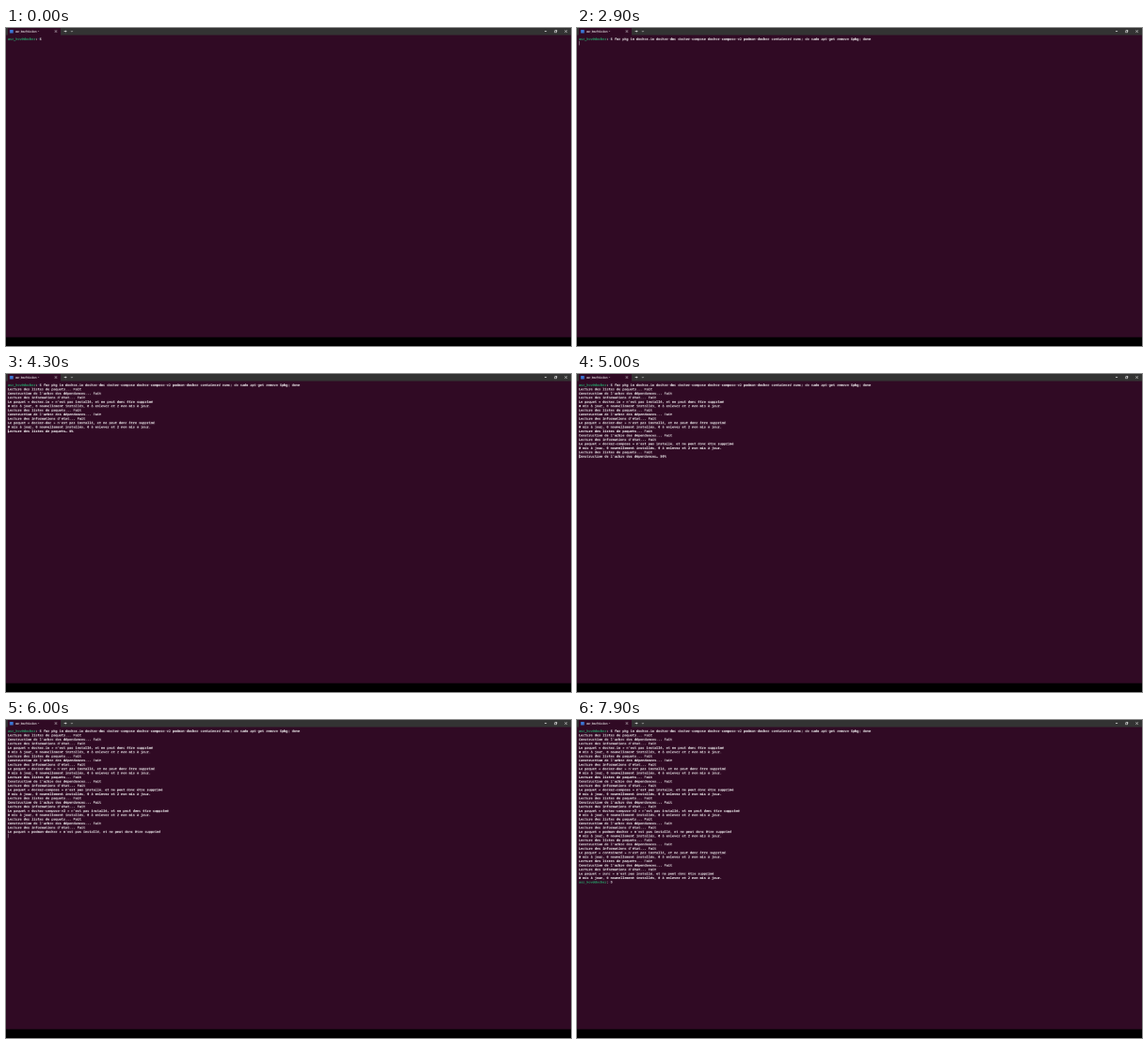
An HTML page with a canvas for the animation above (8000 ms loop, 600x338 px).

```html
<!DOCTYPE html>
<html lang="fr">
<head>
<meta charset="utf-8">
<title>Terminal</title>
<style>
html, body { margin: 0; width: 100%; height: 100%; overflow: hidden; background: #000; }
canvas { display: block; width: 600px; height: 338px; }
</style>
</head>
<body>
<canvas id="stage" width="600" height="338"></canvas>
<script>
const LOOP = 8000;
const W = 2560, H = 1440;           // the desktop is drawn full size, then scaled down
const CELL_W = 9, CELL_H = 19, LEFT = 8, TOP = 40;
const BG = '#300a24', FG = '#ffffff', BAR = '#333333';
const GREEN = '#26a269', BLUE = '#12488b';
const MONO = 'bold 15px "Noto Sans Mono", "DejaVu Sans Mono", monospace';

const USER = 'usr_kov@docker';
const PROMPT_LEN = USER.length + 4;
const PACKAGES = ['docker.io', 'docker-doc', 'docker-compose', 'docker-compose-v2',
  'podman-docker', 'containerd', 'runc'];
const COMMAND = `for pkg in ${PACKAGES.join(' ')}; do sudo apt-get remove $pkg; done`;
const LISTS = 'Lecture des listes de paquets';
const TREE = "Construction de l'arbre des dépendances";

const output = PACKAGES.flatMap(name => [
  `${LISTS}... Fait`,
  `${TREE}... Fait`,
  "Lecture des informations d'état... Fait",
  `Le paquet « ${name} » n'est pas installé, et ne peut donc être supprimé`,
  '0 mis à jour, 0 nouvellement installés, 0 à enlever et 2 non mis à jour.'
]);

// [start ms, finished output lines, cursor shown, text of the line in progress]
const HALF = `${TREE}… 50%`, ZERO = `${LISTS}… 0%`;
const RUN = [
  [2900, 0, 1], [3000, 0, 1, ZERO], [3100, 1, 1, `${TREE}… 0%`], [3200, 1, 1, HALF],
  [3300, 4, 1], [3500, 4, 0],
  [3600, 5, 0, ZERO], [3700, 6, 0, HALF], [3800, 7, 0], [3900, 9, 0], [4000, 9, 1],
  [4300, 10, 1, ZERO], [4400, 11, 1, HALF], [4600, 14, 1],
  [5000, 16, 1, HALF], [5200, 19, 0], [5300, 19, 1],
  [5600, 20, 1, ZERO], [5700, 21, 1, HALF], [5900, 24, 0], [6000, 24, 1],
  [6300, 25, 1, ZERO], [6400, 26, 1, HALF], [6600, 29, 1], [6800, 29, 0],
  [7000, 30, 0, ZERO], [7100, 31, 0, HALF], [7300, 34, 0],
  [7700, 35, 0], [7800, 36, 1], [7900, 36, 0]
];
const EDIT_TIMES = [0, 1000, 1500, 1700, 2100, 2600];
const TIMES = [...EDIT_TIMES, ...RUN.map(step => step[0])];

const stage = document.getElementById('stage').getContext('2d');
const desk = document.createElement('canvas');
desk.width = W;
desk.height = H;
const g = desk.getContext('2d');

function rect(x, y, w, h, color) {
  g.fillStyle = color;
  g.fillRect(x, y, w, h);
}

function write(text, col, row, color = FG) {
  g.font = MONO;
  g.fillStyle = color;
  g.fillText(text, LEFT + col * CELL_W, TOP + row * CELL_H + 15);
}

function cursor(col, row) {
  rect(LEFT + col * CELL_W, TOP + row * CELL_H, 2, CELL_H, FG);
}

function prompt(row) {
  const n = USER.length;
  write(USER, 0, row, GREEN);
  write(':', n, row);
  write('~', n + 1, row, BLUE);
  write('$', n + 2, row);
}

function stroke(points, width = 1.6) {
  g.strokeStyle = FG;
  g.lineWidth = width;
  g.beginPath();
  points.forEach(([x, y], i) => i ? g.lineTo(x, y) : g.moveTo(x, y));
  g.stroke();
}

function cross(x, y, r) {
  stroke([[x - r, y - r], [x + r, y + r]]);
  stroke([[x - r, y + r], [x + r, y - r]]);
}

function titleBar() {
  rect(0, 0, W, 32, BAR);
  rect(8, 0, 240, 32, BG);
  rect(17, 8, 16, 15, '#3b78d8');
  g.font = '600 12px "Open Sans", "Noto Sans", sans-serif';
  g.fillStyle = FG;
  g.fillText(`${USER}: ~`, 43, 20);
  cross(226, 15, 5);
  stroke([[263, 15], [275, 15]], 2);
  stroke([[269, 9], [269, 21]], 2);
  stroke([[294, 13], [298, 17], [302, 13]]);
  stroke([[2440, 15], [2450, 15]], 2);
  g.strokeRect(2486, 12, 8, 8);
  stroke([[2489, 10], [2496, 10], [2496, 17]]);
  cross(2537, 15, 5);
}

function editLine(t) {
  if (t < 1700) {
    if (t >= 1000 && t < 1500) cursor(PROMPT_LEN, 0);
    return;
  }
  const pasted = t < 2900;
  if (pasted) {
    rect(LEFT + PROMPT_LEN * CELL_W, TOP, COMMAND.length * CELL_W, CELL_H, FG);
    if (t < 2100 || t >= 2600) cursor(PROMPT_LEN + COMMAND.length, 0);
  }
  write(COMMAND, PROMPT_LEN, 0, pasted ? BG : FG);
}

function runOutput(t) {
  const step = RUN.filter(s => s[0] <= t).pop();
  if (!step) return;
  const [, done, blink, progress] = step;
  output.slice(0, done).forEach((line, i) => write(line, 0, i + 1));
  if (progress) write(progress, 0, done + 1);
  const finished = done > output.length;
  if (finished) prompt(done);
  if (blink) cursor(finished ? PROMPT_LEN : 0, finished ? done : done + 1);
}

function draw(t) {
  rect(0, 0, W, H, BG);
  titleBar();
  prompt(0);
  editLine(t);
  runOutput(t);
  rect(0, 1400, W, 40, '#000000');
  stage.imageSmoothingEnabled = true;
  stage.imageSmoothingQuality = 'high';
  stage.drawImage(desk, 0, 0, 600, 338);
}

let shown = -1;
function tick() {
  const t = performance.now() % LOOP;
  const state = TIMES.filter(time => time <= t).length;
  if (state !== shown) {
    shown = state;
    draw(t);
  }
  requestAnimationFrame(tick);
}
tick();
</script>
</body>
</html>
```
